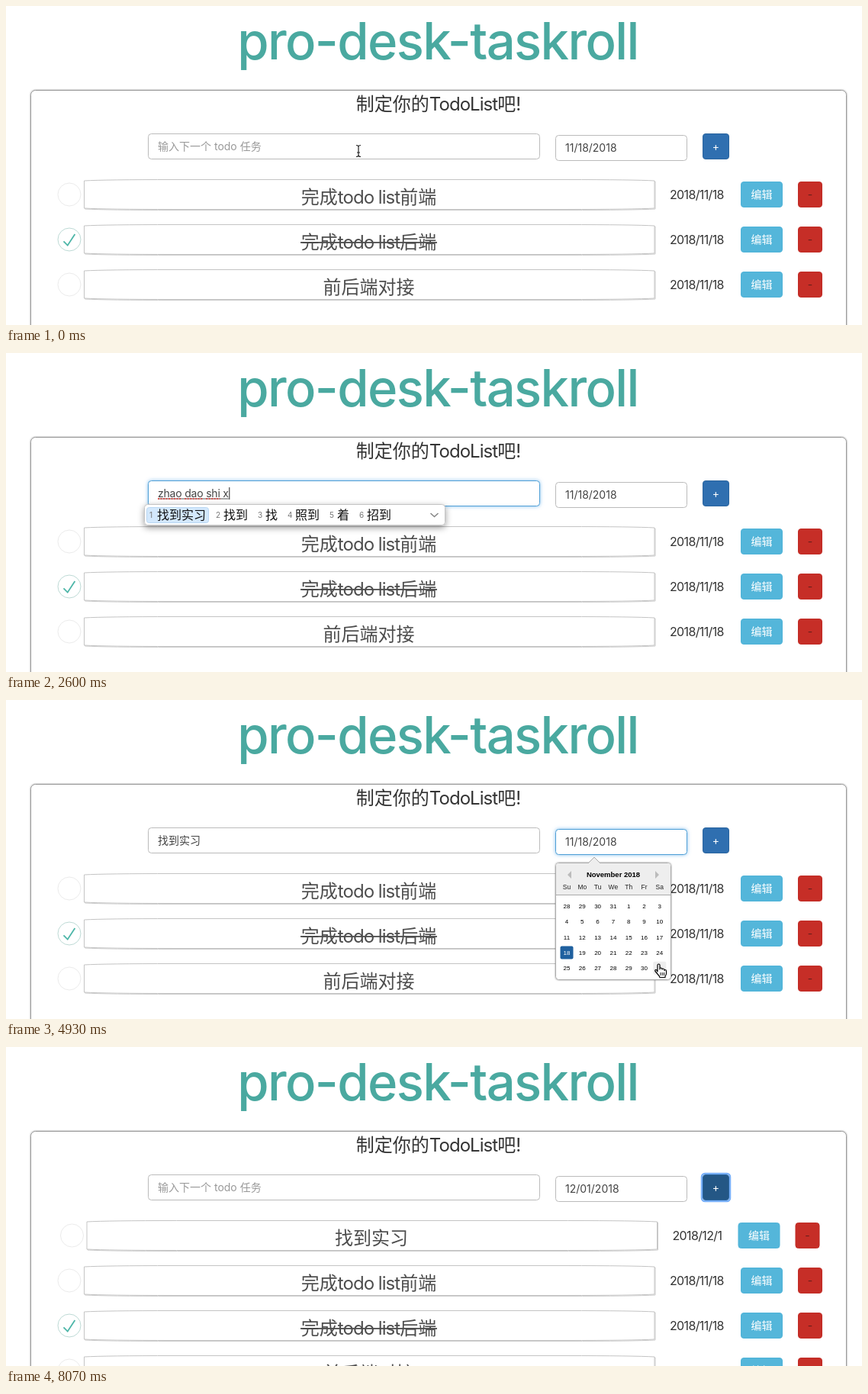
Animation of 1122 by 418 pixels, one loop 8140 ms. Source, as an HTML page:

```html
<!DOCTYPE html>
<html lang="zh">
<head>
<meta charset="utf-8">
<title>Todo list</title>
<style>
  html, body { margin: 0; width: 100%; height: 100%; overflow: hidden; background: #fff; }
  svg { display: block; font-family: Inter, "Noto Sans CJK SC", "Noto Sans CJK", sans-serif; white-space: pre; }
  .cal { font-family: "Liberation Sans", Arial, sans-serif; }
</style>
</head>
<body>
<svg id="stage" width="1122" height="418" viewBox="0 0 1122 418">
  <defs>
    <filter id="soft" x="-5%" y="-5%" width="110%" height="110%"><feDropShadow dx="0" dy="0" stdDeviation="1.2" flood-opacity=".4"/></filter>
    <filter id="drop" x="-10%" y="-30%" width="120%" height="200%"><feDropShadow dx="0" dy="3" stdDeviation="4" flood-opacity=".4"/></filter>
    <filter id="glow" x="-10%" y="-50%" width="120%" height="200%"><feDropShadow dx="0" dy="0" stdDeviation="2.5" flood-color="#66afe9" flood-opacity=".8"/></filter>
  </defs>
  <g id="scene"></g>
</svg>
<script>
const LOOP = 8140;
const FOCUS = 300, TYPE = 550, KEY = 200, COMMIT = 2950;
const OPEN = 3900, PICK = 5250, ADD = 6400;

const WORDS = ['zhao', 'dao', 'shi', 'xi'];
const CHOICES = [
  '在 这 中 做 最 再 自',
  '这 中 只 着 找 种 之',
  '炸 扎 查 眨 渣 诈 闸',
  '找 照 着 招 召 罩 朝',
  '找到 找点 招待 照到 找 着 照',
  '找大 找到 招待 照搭 找 着',
  '找到 照到 招到 找 着 照',
  '找到 找到所 照到 找 着',
  '找到 找到是 照到 找 着',
  '找到是 找到 找 照到 着 招到',
  '找到实习 找到 找 照到 着 招到',
  '找到实习 找到 找 照到 着 招到'
];

// Pointer path: time, x, y
const PATH = [
  [0, 462, 190], [3050, 462, 190], [3530, 836, 170], [3750, 812, 186],
  [4150, 812, 186], [4800, 856, 347], [5300, 856, 347], [5950, 931, 186],
  [7150, 931, 186], [7700, 962, 12]
];

const pen = document.createElement('canvas').getContext('2d');
const widthOf = s => {
  pen.font = '14px Inter, sans-serif';
  return pen.measureText(s).width - .2 * s.length;
};

const rect = (x, y, w, h, fill, extra = '') =>
  `<rect x="${x}" y="${y}" width="${w}" height="${h}" fill="${fill}" ${extra}/>`;
const path = (d, extra) => `<path d="${d}" ${extra}/>`;
const text = (s, x, y, size, fill, extra = '') =>
  `<text x="${x}" y="${y}" font-size="${size}" fill="${fill}" ${extra}>${s}</text>`;
const mid = (s, x, y, size, fill, extra = '') =>
  text(s, x, y, size, fill, 'text-anchor="middle" ' + extra);
// Tightens the Latin runs of mixed text
const tight = s => s.replace(/[ -~]+/g, run => `<tspan letter-spacing="-.04em">${run}</tspan>`);

const field = (x, y, w, focus) => rect(x + .5, y + .5, w, 33, '#fff',
  `rx="4" stroke="${focus ? '#4f9fd6' : '#bbb'}" ${focus ? 'filter="url(#glow)"' : ''}`);

function row(label, date, y, done, dx = 0) {
  const cx = 83 + dx, cy = y + 19.5, right = -dx;
  const box = `M102.5 ${y + 1.5}Q130 ${y} 220 ${y}H733Q823 ${y} 850 ${y + 1.5}` +
    `V${y + 37.5}Q823 ${y + 39} 733 ${y + 39}H220Q130 ${y + 39} 102.5 ${y + 37.5}Z`;
  return `<circle cx="${cx}" cy="${cy}" r="15" fill="#fff" stroke="${done ? '#bddad5' : '#ebebeb'}"/>` +
    (done ? path('M72 25L42 71 27 56l-4 4 20 20 34-52z',
      `transform="translate(${cx - 15} ${cy - 15}) scale(.3)" fill="#4db6a8"`) : '') +
    `<g transform="translate(${dx} 0)">` +
    path(box, 'transform="translate(1 1)" fill="none" stroke="#ccc"') +
    path(box, 'fill="#fff" stroke="#c4c4c4"') +
    mid(tight(label), 475.5, y + 31.5, 24, '#4d4d4d') +
    (done ? rect(386, y + 22.5, 179, 1.8, '#4d4d4d') : '') +
    text(tight(date), 870, y + 25.5, 16, '#333') + '</g>' +
    `<g transform="translate(${right} 0)">` +
    rect(963.5, y + 3, 54, 33, '#54b6da', 'rx="3.5" stroke="#4fb3d8"') +
    mid('编辑', 990.5, y + 24.5, 14, '#fff') +
    rect(1038.5, y + 3, 31, 33, '#c62e27', 'rx="3.5" stroke="#c12c26"') +
    mid('-', 1054, y + 24.5, 14, '#6b1f1c') + '</g>';
}

function composer(n) {
  let left = n;
  const parts = WORDS.map(w => {
    const s = w.slice(0, left);
    left -= s.length;
    return s;
  }).filter(Boolean);
  const typed = parts.join(' '), w = widthOf(typed);
  let out = text(typed, 199, 189, 14, '#444', 'letter-spacing="-.2"') +
    rect(199, 190.5, w, 1, '#555') + rect(199.5 + w, 176, 1, 16, '#222');
  parts.slice(0, -1).forEach((word, i) => {
    const x = 199 + widthOf(parts.slice(0, i).join(' ') + (i ? ' ' : ''));
    out += path(`M${x} 191h${widthOf(word)}`, 'stroke="#d9534f" stroke-width="1.8" stroke-dasharray="2 1.5"');
  });
  out += rect(181.5, 198.5, 394, 27, '#fff', 'rx="4" stroke="#c4c4c4" filter="url(#drop)"');
  let x = 188;
  CHOICES[n - 1].split(' ').forEach((s, i) => {
    const size = 16 * s.length;
    if (!i) out += rect(184.5, 202.5, size + 17, 20, '#d3e8fc', 'rx="3" stroke="#b9d7f3"');
    out += text(i + 1, x, 216, 10, '#777') + text(s, x + 10, 218, 16, '#111', 'font-weight="500"');
    x += size + 23;
  });
  return out + path('M556.5 210l5 4.5 5-4.5', 'fill="none" stroke="#888" stroke-width="1.6"');
}

function calendar(hover) {
  const colX = i => 735 + 20.3 * i;
  let out = rect(720.5, 213.5, 151, 153, '#fff', 'rx="4" stroke="#aaa" filter="url(#soft)"') +
    path('M721 255V217q0-3 3-3H868q3 0 3 3V255Z', 'fill="#eee"') +
    path('M763 214l8-8 8 8', 'fill="#eee" stroke="#aaa"') +
    path('M721 255.5h150', 'stroke="#aaa"') +
    path('M741 224v10l-5-5zM851 224v10l5-5z', 'fill="#bbb"') +
    mid('November 2018', 796, 232, 9.5, '#000', 'font-weight="700"');
  ['Su', 'Mo', 'Tu', 'We', 'Th', 'Fr', 'Sa'].forEach((d, i) => out += mid(d, colX(i), 248, 8.5, '#222'));
  for (let i = 0; i < 35; i++) {
    const day = i < 4 ? i + 28 : i < 34 ? i - 3 : 1;
    const x = colX(i % 7), y = 270 + 20.3 * Math.floor(i / 7), on = i === 21;
    if (on) out += rect(x - 8.5, y - 8.5, 17, 17, '#1f609f', 'rx="2"');
    if (hover && i === 34) out += rect(x - 8.5, y - 8.5, 17, 17, '#eee', 'rx="2"');
    out += mid(day, x, y + 3, 8, on ? '#fff' : '#000');
  }
  return `<g class="cal">${out}</g>`;
}

function pointerAt(t) {
  const i = PATH.findIndex(p => p[0] > t);
  if (i < 0) return PATH[PATH.length - 1].slice(1);
  const [t0, x0, y0] = PATH[i - 1], [t1, x1, y1] = PATH[i];
  const k = (t - t0) / (t1 - t0), e = k * k * (3 - 2 * k);
  return [x0 + (x1 - x0) * e, y0 + (y1 - y0) * e];
}

const inside = ([x, y], l, t, r, b) => x >= l && x <= r && y >= t && y <= b;

function pointer(p, open) {
  const beam = inside(p, 186, 167, 700, 201) || inside(p, 720, 169, 893, 203);
  const hand = inside(p, 913, 167, 948, 201) || open && inside(p, 725, 260, 868, 362);
  const shape = beam
    ? path('M-3-7.500q3 0 3 2q0-2 3-2M0-6V6M-3 7.500q3 0 3-2q0 2 3 2M-2 2h4', 'fill="none" stroke="#222" stroke-width="1.2"')
    : hand
      ? path('M-2 7V.5Q-2-1-.5-1T1 .5V6V5q0-1 1.3-1T4 5.5V6q0-1 1.2-1T7 6.5V7.5q0-1 1.2-1T9.5 8V11q0 2-1.5 4V16.5H1Q0 14-2 12L-5 8.5q-.7-1.5.5-2T-2 9Z',
        'fill="#fff" stroke="#000" stroke-width="1.2" stroke-linejoin="round"') +
        path('M2 10v4M4.3 10v4M6.5 10v4', 'stroke="#000" stroke-width=".9"')
      : path('M0 0V14l3.2-3 2.2 5 2-.9-2.2-4.9h4.4Z', 'fill="#000" stroke="#fff"');
  return `<g transform="translate(${p[0].toFixed(1)} ${p[1].toFixed(1)})">${shape}</g>`;
}

function scene(t) {
  const typing = t >= TYPE && t < COMMIT, open = t >= OPEN && t < PICK, added = t >= ADD;
  const inText = t >= FOCUS && t < OPEN, inDate = t >= OPEN && t < ADD;
  const p = pointerAt(t);
  const overAdd = inside(p, 913, 167, 948, 201);

  let out = mid('pro-desk-taskroll', 566, 69.5, 67, '#4aa9a0', 'font-weight="500" letter-spacing="-.024em"') +
    rect(32.5, 110.5, 1069, 340, '#fff', 'rx="6" stroke="#999" filter="url(#soft)"') +
    mid(tight('制定你的TodoList吧!'), 566.5, 137, 24, '#333') +
    field(186, 167, 513, inText) + field(720, 169, 172, inDate) +
    text(t < PICK ? '11/18/2018' : '12/01/2018', 733, 191, 14, '#444');

  if (added) out += rect(912, 166, 37, 36, '#fff', 'rx="4" stroke="#78b0f8" stroke-width="2.5"');
  out += rect(913.5, 167.5, 34, 33, added || overAdd ? '#245785' : '#2f6fb0', 'rx="3.5" stroke="#2a659f"') +
    mid('+', 930.5, 189, 14, '#fff');

  const items = [['完成todo list前端'], ['完成todo list后端', true], ['前后端对接']];
  if (added) out += row('找到实习', '2018/12/1', 227.5, false, 3.5);
  items.forEach(([label, done], i) => out += row(label, '2018/11/18', 227.5 + 59 * (i + added), done));

  if (typing) out += composer(Math.min(12, Math.floor((t - TYPE) / KEY) + 1));
  else if (t < TYPE || added) out += text('输入下一个 todo 任务', 199, 189, 14, '#999');
  else out += text('找到实习', 199, 189, 14, '#444');
  if (inText && !typing && t % 1060 > 530) out += rect(t < TYPE ? 199 : 256, 176, 1, 16, '#222');

  if (open) out += calendar(inside(p, 848, 341, 866, 361));
  const hidden = t >= TYPE && t < 3050 || t >= 7700;
  return out + (hidden ? '' : pointer(p, open));
}

const root = document.getElementById('scene');
const start = performance.now();
let last = '';
function draw() {
  const next = scene((performance.now() - start) % LOOP);
  if (next !== last) root.innerHTML = last = next;
  requestAnimationFrame(draw);
}
draw();
</script>
</body>
</html>
```
